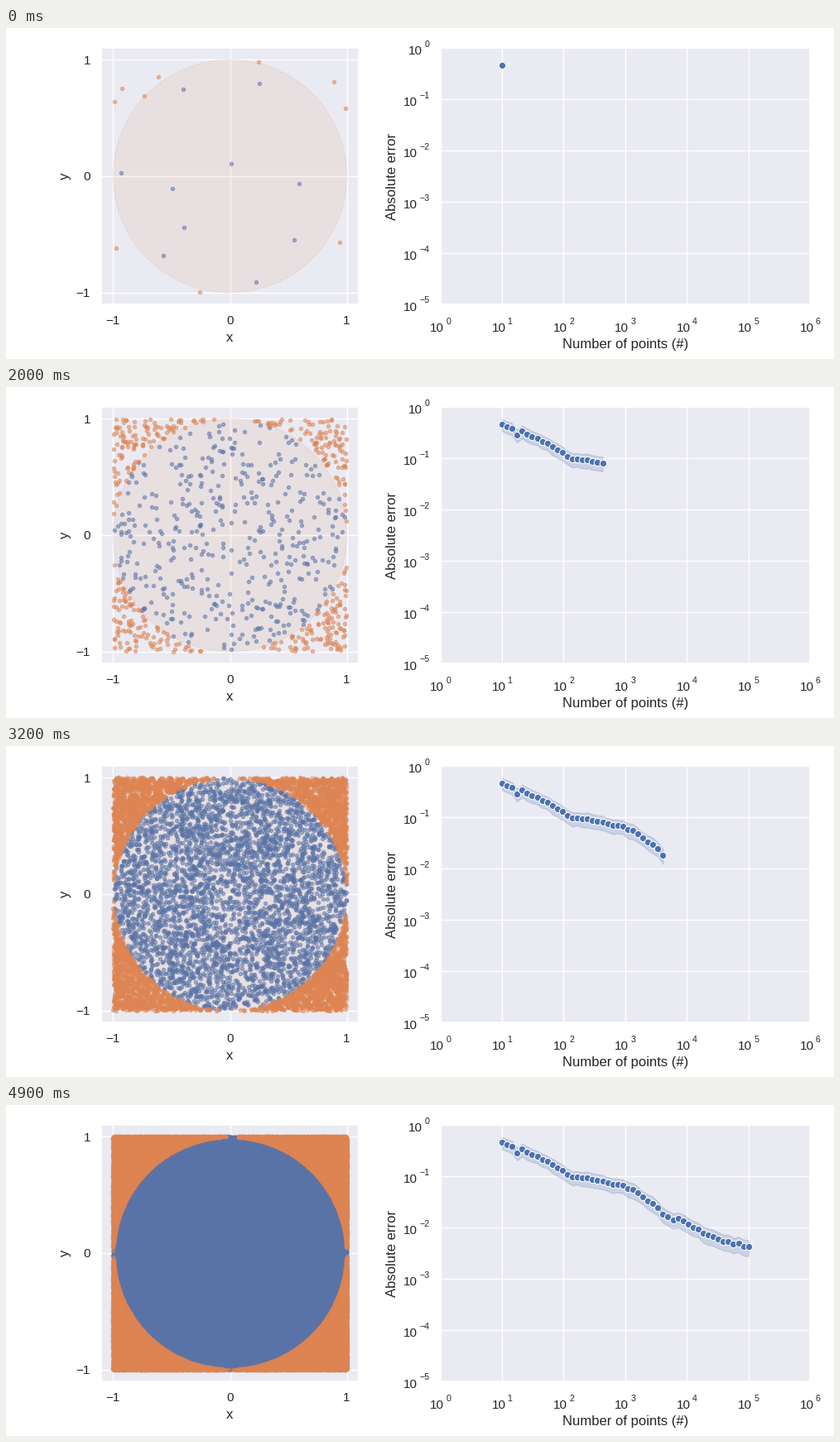
A matplotlib script that plays this animation: 1000 by 400 pixels, repeating every 5000 ms.

```python
import numpy as np
import matplotlib.pyplot as plt
from matplotlib.animation import FuncAnimation
from matplotlib.collections import PolyCollection
from matplotlib.patches import Circle

BLUE, ORANGE, PANEL, INK = "#4C72B0", "#DD8452", "#EAEAF2", "#262626"
W, H, DPI = 1000, 400, 100
FRAMES = 50
TOP, BOTTOM = 24.2, 333.8

plt.rcParams.update({
    "font.family": "Liberation Sans", "text.color": INK,
    "axes.facecolor": PANEL, "axes.edgecolor": "white", "axes.linewidth": 1.25,
    "axes.labelcolor": INK, "axes.labelsize": 12, "axes.axisbelow": True,
    "axes.grid": True, "grid.color": "white", "grid.linewidth": 1,
    "xtick.labelsize": 11, "ytick.labelsize": 11,
    "xtick.labelcolor": INK, "ytick.labelcolor": INK,
    "xtick.major.size": 6, "ytick.major.size": 6,
    "xtick.bottom": False, "ytick.left": False,
    "lines.solid_capstyle": "round",
})

rng = np.random.default_rng(7)

# Uniform samples of the square, split by the unit circle
steps = np.logspace(1, 5, FRAMES)
square = rng.uniform(-1, 1, (480_000, 2))
is_in = (square ** 2).sum(axis=1) <= 1
inside, outside = square[is_in], square[~is_in]

# Mean error: a falling trend through a few key steps, plus small noise
key_step = [0, 2, 3, 4, 14, 20, 25, 31, 33, 36, 42, 49]
key_log = [-.34, -.42, -.55, -.47, -1.0, -1.1, -1.22, -1.6, -1.82, -1.87, -2.2, -2.38]
k_all = np.arange(FRAMES)
noise = rng.uniform(-.03, .03, FRAMES) * (k_all > 4)
err = 10 ** (np.interp(k_all, key_step, key_log) + noise)
spread = .24 + .0015 * k_all + rng.uniform(0, .06, FRAMES)
low, high = err * (1 - spread), err * (1 + spread)

fig = plt.figure(figsize=(W / DPI, H / DPI), dpi=DPI, facecolor="white")


def panel(x0, x1):
    """Axes between two pixel columns."""
    return fig.add_axes([x0 / W, 1 - BOTTOM / H, (x1 - x0) / W, (BOTTOM - TOP) / H])


def write(x, y, text, size, **kw):
    """Text at a pixel position, measured from the top left."""
    fig.text(x / W, 1 - y / H, text, size=size, **kw)


def power(right_edge, baseline, exponent):
    """Power of ten with a small raised exponent."""
    label = str(exponent).replace("-", "\u2212")
    write(right_edge, baseline - 9, label, 7.7, ha="right")
    write(right_edge - 6.1 * len(label) - 2, baseline, "10", 11, ha="right")


def dots(color):
    return left.scatter([], [], s=36, marker=".", color=color, alpha=.5, linewidths=1)


left = panel(115.3, 425.7)
left.set(xlim=(-1.1, 1.1), ylim=(-1.1, 1.1), xticks=[-1, 0, 1], yticks=[-1, 0, 1],
         xlabel="x", ylabel="y")
in_dots, out_dots = dots(BLUE), dots(ORANGE)
left.add_patch(Circle((0, 0), 1, color=ORANGE, alpha=.1, linewidth=1))

X0, X1 = 524.6, 971.1
right = panel(X0, X1)
right.set(xscale="log", yscale="log", xlim=(1, 1e6), ylim=(1e-5, 1))
right.tick_params(which="both", bottom=False, left=False,
                  labelbottom=False, labelleft=False)
for e in range(7):
    power(X0 + (X1 - X0) * e / 6 + 12.5, 367.2, e)
for e in range(6):
    power(X0 - 13.2, TOP + (BOTTOM - TOP) * e / 5 + 7.7, -e)
write((X0 + X1) / 2, 387.5, "Number of points (#)", 12, ha="center")
write(471, (TOP + BOTTOM) / 2, "Absolute error", 12, rotation=90,
      rotation_mode="anchor", ha="center")

band = PolyCollection([], color=BLUE, alpha=.2, linewidth=1)
right.add_collection(band, autolim=False)
curve, = right.plot([], [], color=BLUE, lw=1.5, marker="o", ms=6, mec="white", mew=.75)


def update(k):
    n, m = int(steps[k]), k + 1
    in_dots.set_offsets(inside[:n])
    out_dots.set_offsets(outside[:n])
    curve.set_data(steps[:m], err[:m])
    outline = np.column_stack([np.r_[steps[:m], steps[:m][::-1]],
                               np.r_[low[:m], high[:m][::-1]]])
    band.set_verts([outline] if k else [])
    return in_dots, out_dots, band, curve


anim = FuncAnimation(fig, update, frames=FRAMES, interval=100, repeat=True, repeat_delay=0)
plt.show()
```
